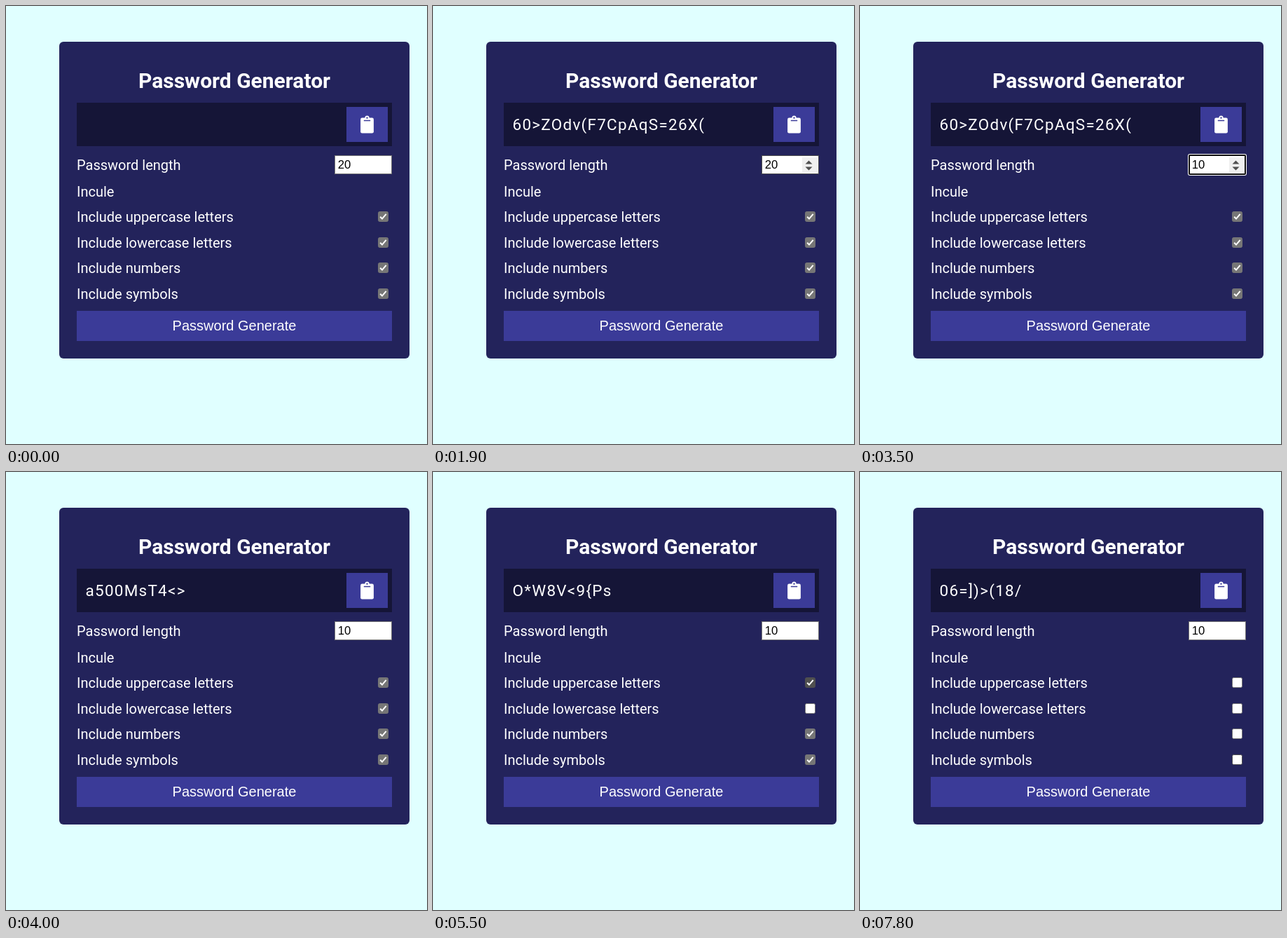
An HTML page that plays this animation: 601x625 px, repeating every 8000 ms.

```html
<!DOCTYPE html>
<html lang="en">
<head>
<meta charset="utf-8">
<title>Password Generator</title>
<style>
  html, body { margin: 0; width: 100%; height: 100%; overflow: hidden; background: #e0ffff; }
  svg { display: block; width: 601px; height: 625px; }
  text { fill: #fff; font: 20px Roboto, sans-serif; white-space: pre; }
  .title { font-size: 30px; font-weight: 700; text-anchor: middle; }
  .password { font-size: 22.5px; letter-spacing: 1.25px; }
  .action { font: 20px "Liberation Sans", Arial, sans-serif; text-anchor: middle; }
  .field text { fill: #000; font: 16.667px "Liberation Sans", Arial, sans-serif; }
  .field .picked { fill: #fff; }
</style>
</head>
<body>
<svg viewBox="0 0 601 625">
  <rect width="601" height="625" fill="#e0ffff"/>
  <rect x="76" y="51" width="500" height="452" rx="6" fill="#23235b"/>
  <text class="title" x="326" y="117">Password Generator</text>

  <rect x="101" y="138" width="450" height="62" fill="#151537"/>
  <text class="password" id="password" x="113.5" y="177"></text>
  <rect x="486" y="144" width="59" height="50" fill="#3b3b98"/>
  <g fill="#fff">
    <rect x="506.1" y="159.6" width="18.8" height="21.9" rx="2.3"/>
    <circle cx="515.5" cy="159.6" r="3.1"/>
    <g fill="#3b3b98">
      <circle cx="515.5" cy="159.6" r="1.2"/>
      <rect x="510.8" y="162.8" width="9.4" height="1.5" rx=".3"/>
    </g>
  </g>

  <text x="101" y="234">Password length</text>
  <g class="field">
    <rect id="border" x="469.5" y="213.5" width="81" height="26" fill="#fff"/>
    <g id="ring">
      <rect x="468" y="211" width="84" height="31" rx="3" fill="#fff"/>
      <rect x="470" y="213" width="80" height="27" rx="1" fill="#fff" stroke="#101010" stroke-width="2"/>
    </g>
    <g id="spinner">
      <rect x="527" y="216" width="22" height="22" fill="#f0f0f0"/>
      <path d="M531.5 225.5l5-5 5 5zM531.5 229.5l5 5 5-5z" fill="#505050"/>
    </g>
    <rect id="highlight" y="217" height="19" fill="#3390ff"/>
    <text x="473.75" y="232"><tspan id="plain"></tspan><tspan id="picked" class="picked"></tspan></text>
    <rect id="caret" y="217" width="1" height="19"/>
  </g>

  <text x="101" y="272">Incule</text>
  <g id="options"></g>

  <g id="action">
    <rect x="101" y="435" width="450" height="43" fill="#3b3b98"/>
    <text class="action" x="326" y="463">Password Generate</text>
  </g>
</svg>
<script>
const LOOP = 8000;
const TEXT_X = 473.75, DIGIT = 9.27;
const GREY = { idle: '#767676', hover: '#4f4f4f', press: '#8d8d8d' };
const $ = id => document.getElementById(id);

const start = {
  password: '', pressed: false,
  length: '20', over: false, focus: false, caret: false, selected: 0,
  checked: [1, 1, 1, 1], target: -1, mode: 'idle'
};

const push = { pressed: true };
const generate = password => ({ password, pressed: false });
const point = (target, mode) => ({ target, mode });
const leave = point(-1, 'idle');
const uncheck = (target, ...checked) => ({ ...point(target, 'hover'), checked });

// Each step changes only the listed parts of the state.
const steps = [
  [0, {}],
  [500, generate('6W4T0y82(W3O^p)jcKI5')],
  [1000, generate('GW866y228OW^)j(pKIc6')],
  [1300, push],
  [1400, generate('60>ZOdv(F7CpAqS=26X(')],
  [1900, { over: true }],
  [2100, { focus: true, caret: true }],
  [2200, { caret: false, selected: 1 }],
  [2300, { selected: 2 }],
  [2900, { length: '1', selected: 0, caret: true }],
  [3000, { length: '10' }],
  [3500, { caret: false }],
  [3900, { ...push, over: false, focus: false }],
  [4000, generate('a500MsT4<>')],
  [4400, push],
  [4500, generate('O*W8V<9{Ps')],
  [4900, point(1, 'hover')],
  [5100, point(1, 'press')],
  [5200, uncheck(1, 1, 0, 1, 1)],
  [5300, leave],
  [5500, point(0, 'hover')],
  [5600, point(0, 'press')],
  [5700, uncheck(0, 0, 0, 1, 1)],
  [6000, { ...push, ...leave }],
  [6100, generate('/(.85,0[40')],
  [6500, push],
  [6600, generate('06=])>(18/')],
  [7100, point(2, 'hover')],
  [7200, point(2, 'press')],
  [7300, uncheck(2, 0, 0, 0, 1)],
  [7400, leave],
  [7500, point(3, 'hover')],
  [7700, point(3, 'press')],
  [7800, uncheck(3, 0, 0, 0, 0)]
];

let last = start;
const states = steps.map(([at, change]) => ({ ...(last = { ...last, ...change }), at }));

const options = [
  ['uppercase letters', 293], ['lowercase letters', 330],
  ['numbers', 366], ['symbols', 403]
];
$('options').innerHTML = options.map(([name, y]) => `
  <text x="101" y="${y + 15}">Include ${name}</text>
  <g transform="translate(531 ${y})">
    <rect class="box" x=".5" y=".5" width="14" height="14" rx="2"/>
    <path class="tick" d="M3.2 7.7l2.8 2.9 5.7-6.8" fill="none" stroke="#fff" stroke-width="2"/>
  </g>`).join('');
const boxes = [...document.querySelectorAll('.box')];
const ticks = [...document.querySelectorAll('.tick')];

const show = (el, on) => el.setAttribute('visibility', on ? 'visible' : 'hidden');

function draw(s) {
  $('password').textContent = s.password;
  $('action').setAttribute('transform',
    s.pressed ? 'translate(326 456.5) scale(.98) translate(-326 -456.5)' : '');

  const split = s.length.length - s.selected;
  const end = TEXT_X + s.length.length * DIGIT;
  $('plain').textContent = s.length.slice(0, split);
  $('picked').textContent = s.length.slice(split);
  $('highlight').setAttribute('x', end - s.selected * DIGIT);
  $('highlight').setAttribute('width', s.selected * DIGIT);
  $('caret').setAttribute('x', Math.round(end));
  $('border').setAttribute('stroke', s.over ? GREY.hover : GREY.idle);
  show($('ring'), s.focus);
  show($('spinner'), s.over || s.focus);
  show($('caret'), s.caret);

  boxes.forEach((box, i) => {
    const grey = GREY[s.target === i ? s.mode : 'idle'];
    box.setAttribute('stroke', grey);
    box.setAttribute('fill', s.checked[i] ? grey : '#fff');
    show(ticks[i], s.checked[i]);
  });
}

const began = performance.now();
let shown;
function tick() {
  const t = (performance.now() - began) % LOOP;
  const state = states.findLast(s => s.at <= t);
  if (state !== shown) draw(shown = state);
  requestAnimationFrame(tick);
}
tick();
</script>
</body>
</html>
```
